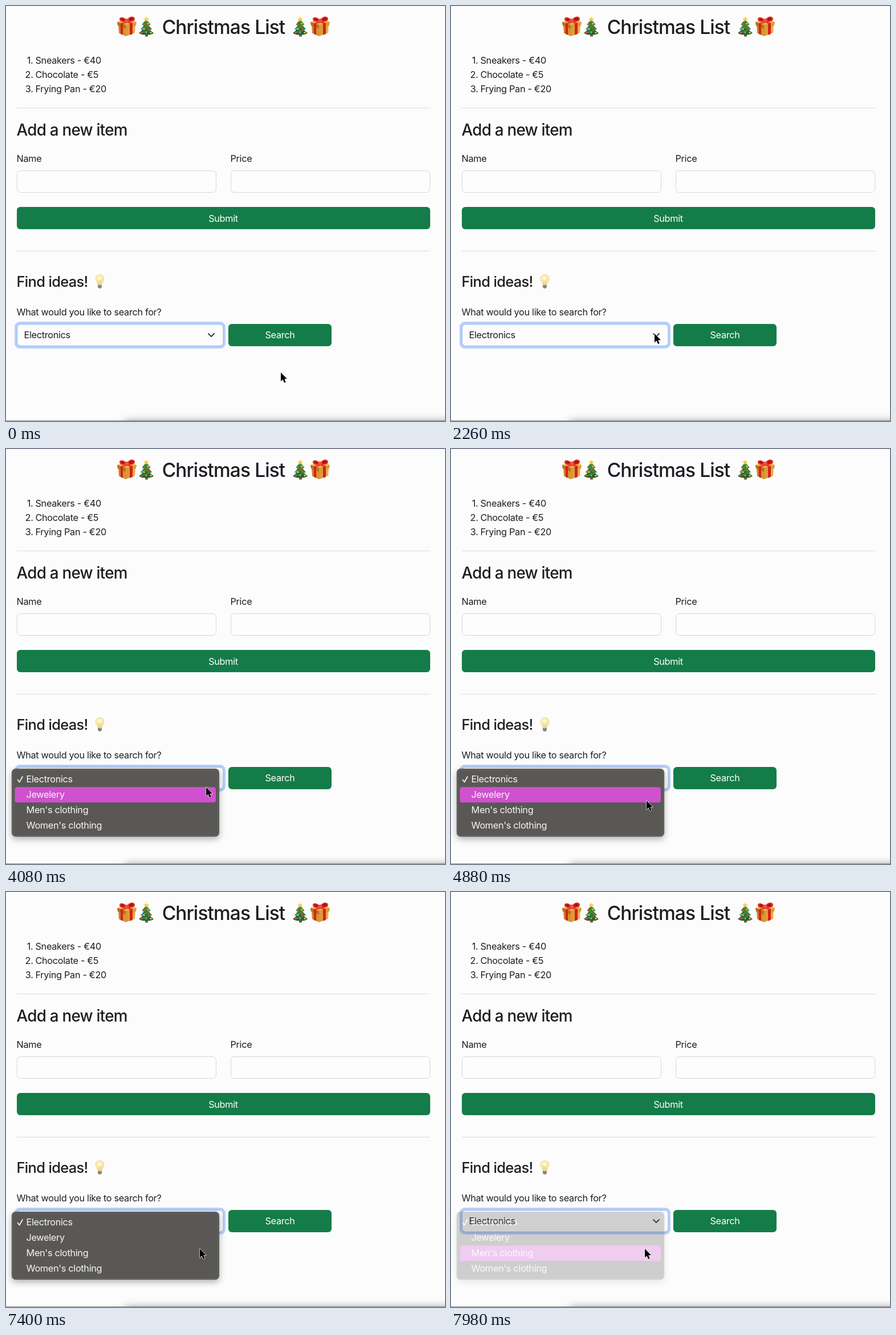
An HTML page that plays this animation: 770x727 px, repeating every 8000 ms.

```html
<!DOCTYPE html>
<html lang="en">
<head>
<meta charset="utf-8">
<title>Christmas List</title>
<style>
  html, body { margin: 0; width: 100%; height: 100%; overflow: hidden; background: #fcfcfd; }
  svg { display: block; }
  text {
    font: 400 16.3px Inter, "Open Sans", sans-serif;
    font-optical-sizing: none;
    letter-spacing: -0.02em;
    fill: #1c1e22;
    white-space: pre;
  }
  .heading { font-weight: 500; letter-spacing: -0.027em; }
  .h1 { font-size: 33.5px; }
  .h2 { font-size: 27.8px; }
  .h3 { font-size: 25.5px; }
  .mid { text-anchor: middle; }
  .end { text-anchor: end; }
  .light { fill: #fff; }
  .rule { fill: #dddde0; }
  .input { fill: #fdfdfe; stroke: #d3d7e3; }
  .button { fill: #147c48; }
  .menu-box { fill: #595855; stroke: #454542; filter: drop-shadow(0 4px 6px rgba(0, 0, 0, .32)); }
  .window { filter: drop-shadow(0 0 7px rgba(0, 0, 0, .38)); }
  .menu text { fill: #f6f6f5; }
</style>
</head>
<body>
<svg width="770" height="727" viewBox="0 0 770 727">
  <defs>
    <linearGradient id="gold" x2="1">
      <stop offset="0" stop-color="#c98124"/><stop offset="1" stop-color="#eeb04a"/>
    </linearGradient>
    <radialGradient id="glow" cx=".45" cy=".4">
      <stop offset="0" stop-color="#fffde9"/><stop offset="1" stop-color="#f8e391"/>
    </radialGradient>
    <g id="gift">
      <path d="M3 14 16 20V35L4 29.500zM16 20 33 14 32 29 16 35z" fill="url(#gold)"/>
      <path d="M1 10 20 5 35 10 34 16 16 22 2 16z" fill="#dc9a38"/>
      <path d="M1 10 20 5 35 10 16 15z" fill="#efb755"/>
      <path d="M16 15V22L2 16 1 10z" fill="#b8701c"/>
      <path d="M7 12 11 13.500V32.500L7 31zM23 13 28 11.500V31L23 32.700z" fill="#cf2418"/>
      <path d="M7 12 24 7 28 8.500 11 13.500zM10 7 14 6 28 11.500 23 13z" fill="#e9382a"/>
      <path d="M18 9C11 11 5 9 5 5S12 0 18 7C22-1 31-1 32 4S25 10 18 9z" fill="#df2c20"/>
      <path d="M15 7C11 8 8 7 8 5S12 3 15 7zM21 7C23 2 28 1 29 4S25 8 21 7z" fill="#a9130f"/>
      <ellipse cx="18" cy="7" rx="3.500" ry="3" fill="#f3503e"/>
    </g>
    <g id="tree">
      <path d="M12 28H17V35H12z" fill="#87512c"/>
      <path d="M14 18 27 29Q21 33 14 31.500 7 33 1 29z" fill="#24612a"/>
      <path d="M14 11 24 22Q19 25 14 24 9 25 4 22z" fill="#2e7532"/>
      <path d="M14 4 21.500 14Q18 17 14 16 10 17 6.500 14z" fill="#3b883b"/>
      <path d="M6 20Q15 20 19 14M4 28Q17 27 22 21" fill="none" stroke="#84aa4b"/>
      <path d="M14 0 15.300 3.200 19 3.500 16.200 5.800 17 9 14 7.300 11 9 11.800 5.800 9 3.500 12.700 3.200z" fill="#f9c83b"/>
      <g fill="#e5483c"><circle cx="10" cy="14" r="1.600"/><circle cx="18" cy="20" r="1.700"/><circle cx="6" cy="28" r="1.700"/></g>
      <g fill="#f3bf42"><circle cx="17" cy="12" r="1.500"/><circle cx="10" cy="22" r="1.600"/><circle cx="22" cy="28" r="1.700"/></g>
      <g fill="#58a9d8"><circle cx="14" cy="28" r="1.600"/><circle cx="7" cy="21" r="1.300"/></g>
    </g>
  </defs>

  <rect width="770" height="727" fill="#fcfcfd"/>
  <use href="#gift" x="194" y="18"/>
  <use href="#tree" x="232" y="18.500"/>
  <use href="#tree" x="502" y="18.500"/>
  <use href="#gift" x="533" y="18"/>
  <text class="heading h1 mid" x="381.500" y="49">Christmas List</text>

  <g id="list"></g>
  <rect class="rule" x="19" y="178" width="725" height="1"/>

  <text class="heading h2" x="18.500" y="227">Add a new item</text>
  <text x="18.500" y="273">Name</text>
  <text x="393.500" y="273">Price</text>
  <rect class="input" x="19.500" y="288.500" width="349" height="38" rx="6"/>
  <rect class="input" x="394.500" y="288.500" width="349" height="38" rx="6"/>
  <rect class="button" x="19" y="352" width="725" height="39" rx="6"/>
  <text class="light mid" x="381" y="378">Submit</text>
  <rect class="rule" x="19" y="429" width="725" height="1"/>

  <text class="heading h3" x="18.500" y="492">Find ideas!</text>
  <g transform="translate(156.500 470)">
    <path d="M8 .5C3.500 .5 .5 4 .5 8 .5 12 4 14 4.500 18.500H11.500C12 14 15.500 12 15.500 8 15.500 4 12.500 .5 8 .5z" fill="url(#glow)" stroke="#e7d48d" stroke-width=".7"/>
    <path d="M6.500 18V11L5 9M9.500 18V11L11 9" fill="none" stroke="#d9b95c" stroke-width=".8"/>
    <path d="M4.500 18.500H11.500V22.500L9.500 25H6.500L4.500 22.500z" fill="#a5a5a3"/>
    <path d="M4.500 20.500H11.500M5 22.700H11" stroke="#5e5e5e"/>
  </g>
  <text x="18.500" y="542">What would you like to search for?</text>
  <rect x="15" y="553" width="370" height="47" rx="9" fill="#b9d0fa"/>
  <rect x="19.500" y="557.500" width="361.500" height="38" rx="6" fill="#fdfdfe" stroke="#86b1f4"/>
  <text x="31.500" y="582">Electronics</text>
  <path d="M355 574 360 579 365 574" fill="none" stroke="#2f343a" stroke-width="1.800" stroke-linecap="round" stroke-linejoin="round"/>
  <rect class="button" x="390" y="557" width="181" height="39" rx="6"/>
  <text class="light mid" x="480.500" y="582">Search</text>

  <rect class="window" x="205" y="727" width="700" height="60" rx="10"/>
  <rect y="726" width="770" height="1" fill="#8b8b8d"/>

  <g id="menu" class="menu">
    <rect class="menu-box" x="10.500" y="560.500" width="363" height="118" rx="6"/>
    <rect x="11.500" y="561.500" width="361" height="116" rx="5" fill="none" stroke="#72716e"/>
    <rect id="highlight" x="15.500" width="352.500" height="27" rx="4" fill="#d050cf"/>
    <path d="M20.500 579.500 23.500 583.500 29 574" fill="none" stroke="#f6f6f5" stroke-width="1.700" stroke-linecap="round" stroke-linejoin="round"/>
    <g id="options"></g>
  </g>

  <path id="cursor" d="M0 0V15.500L3.500 12.300 6 18 8.700 16.900 6.300 11.300H11z" fill="#000" stroke="#fff" stroke-width="1.200" stroke-linejoin="round" paint-order="stroke"/>
</svg>
<script>
  const LOOP = 8000;
  const MENU_OPEN = 2700, FADE_START = 7760, FADE_LENGTH = 305;

  // [time, x, y] of the pointer tip
  const path = [
    [0, 482, 642], [60, 482, 642], [820, 442, 633], [1600, 388, 599], [2150, 357, 574],
    [3400, 357, 574], [4100, 351, 593], [4800, 343, 616], [4900, 343, 616],
    [5500, 340, 625], [LOOP, 340, 625]
  ];
  // [time, highlighted row], -1 for none
  const rows = [[0, 0], [4080, 1], [5120, 2], [7380, -1], [7440, 2]];

  const byId = id => document.getElementById(id);
  const menu = byId("menu"), highlight = byId("highlight"), cursor = byId("cursor");

  function addText(parent, x, y, content, className = "") {
    const node = document.createElementNS("http://www.w3.org/2000/svg", "text");
    node.setAttribute("x", x);
    node.setAttribute("y", y);
    node.setAttribute("class", className);
    node.textContent = content;
    byId(parent).append(node);
  }

  ["Sneakers - €40", "Chocolate - €5", "Frying Pan - €20"].forEach((item, i) => {
    const y = 101 + i * 24.8;
    addText("list", 47.5, y, `${i + 1}.`, "end");
    addText("list", 51.5, y, item);
  });
  ["Electronics", "Jewelery", "Men's clothing", "Women's clothing"].forEach((item, i) =>
    addText("options", 35.5, 584 + i * 27, item));

  function pointerAt(t) {
    const i = path.findIndex(step => step[0] > t);
    const [t0, x0, y0] = path[i - 1], [t1, x1, y1] = path[i];
    const k = (t - t0) / (t1 - t0);
    return [x0 + (x1 - x0) * k, y0 + (y1 - y0) * k];
  }

  function render(t) {
    const [x, y] = pointerAt(t);
    cursor.setAttribute("transform", `translate(${x} ${y})`);

    const row = rows.filter(step => step[0] <= t).pop()[1];
    highlight.style.visibility = row < 0 ? "hidden" : "inherit";
    highlight.setAttribute("y", 565.3 + row * 27);

    const fade = Math.min(1, Math.max(0, (t - FADE_START) / FADE_LENGTH));
    menu.style.visibility = t < MENU_OPEN ? "hidden" : "visible";
    menu.style.opacity = 1 - fade;
  }

  const start = performance.now();
  function tick() {
    render((performance.now() - start) % LOOP);
    requestAnimationFrame(tick);
  }
  tick();
</script>
</body>
</html>
```
